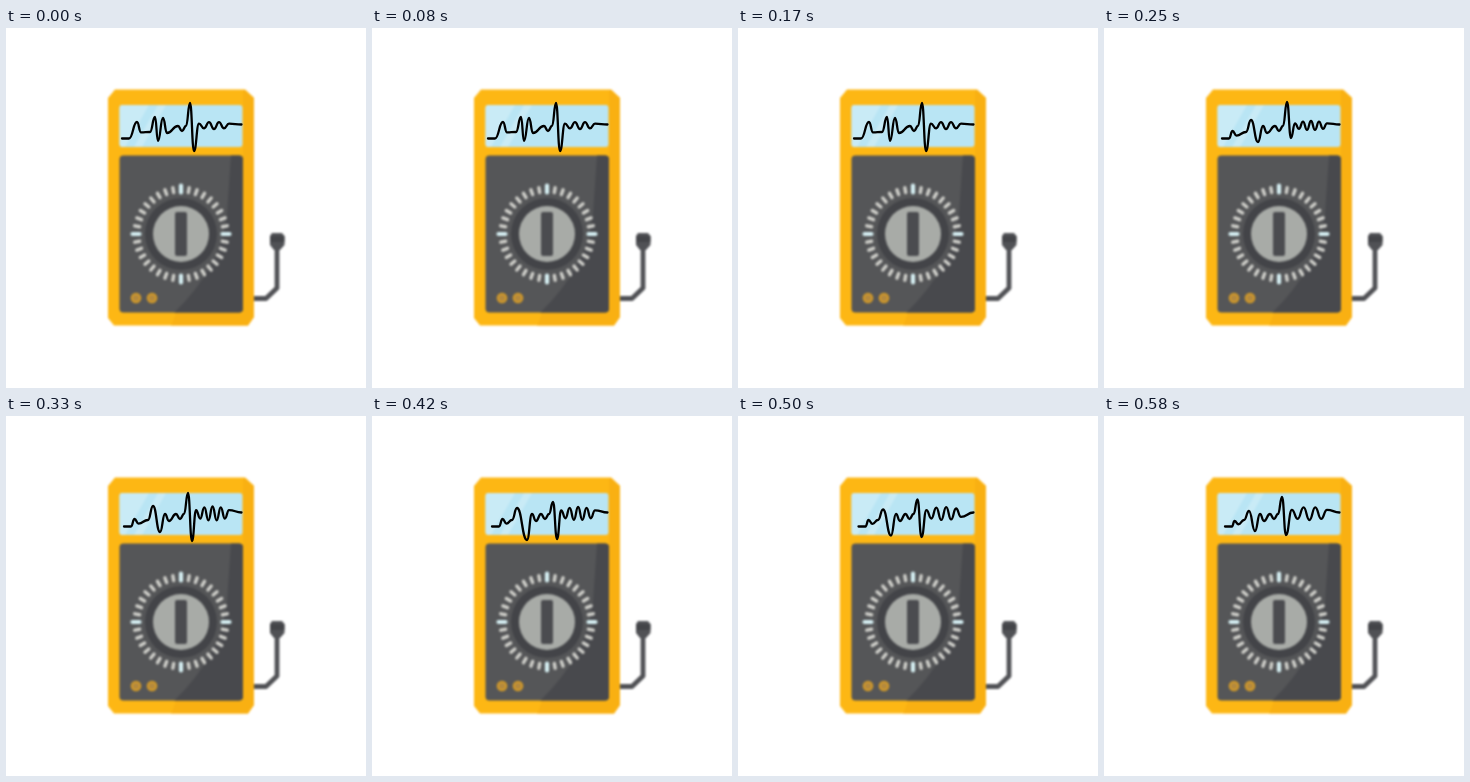
Animation, 360 px wide and 360 px high, one loop 660 ms. Source, as an HTML page:

```html
<!DOCTYPE html>
<html lang="en">
<head>
<meta charset="utf-8">
<title>Multimeter</title>
<style>
  html, body { margin: 0; width: 100%; height: 100%; overflow: hidden; background: #fff; }
  svg { display: block; width: 100vw; height: 100vh; }
  #meter { filter: blur(.9px); }
</style>
</head>
<body>
<svg viewBox="0 0 360 360">
  <defs>
    <clipPath id="case"><path d="M109 61.5H239L248 70V289L242 297.5H108L102 290V70Z"/></clipPath>
    <clipPath id="screen"><rect x="113.5" y="77" width="123" height="42" rx="3"/></clipPath>
    <clipPath id="panel"><rect x="113.5" y="127.5" width="123.5" height="157" rx="4"/></clipPath>
  </defs>
  <g id="meter">
    <path d="M248 270.5H260L271 260V220" fill="none" stroke="#505155" stroke-width="4.8" stroke-linejoin="round"/>
    <path d="M266 205H276L278.5 208V217L274 222H268L264 217V208Z" fill="#505155"/>
    <path d="M264 208H278.5V214H264Z" fill="#434448"/>

    <g clip-path="url(#case)">
      <rect x="101" y="61" width="148" height="238" fill="#fdb714"/>
      <path d="M165 298L170 285H237V62H249V298Z" fill="#f9b012"/>
    </g>

    <g clip-path="url(#screen)">
      <rect x="113" y="77" width="125" height="42" fill="#b9e5f4"/>
      <path d="M113 77H143L119 119H113ZM152 77H160L136 119H128Z" fill="#c9ebf6"/>
    </g>

    <g clip-path="url(#panel)">
      <rect x="113" y="127" width="125" height="158" fill="#555658"/>
      <path d="M225 127H238V285H168Q216 238 221 185Z" fill="#48494d"/>
    </g>
    <g id="ticks" stroke-linecap="round"></g>
    <circle cx="175" cy="206" r="36" fill="#434448"/>
    <circle cx="175" cy="206" r="28" fill="#a8aba7"/>
    <rect x="169" y="184" width="12" height="44" rx="2" fill="#4b4c50"/>
    <g fill="#b58a3d" stroke="#d29a28" stroke-width="2">
      <circle cx="130" cy="270" r="4.3"/>
      <circle cx="146" cy="270" r="4.3"/>
    </g>
  </g>
  <path id="trace" fill="none" stroke="#000" stroke-width="2.3" stroke-linecap="round" stroke-linejoin="round"/>
</svg>
<script>
  const TICKS = 36;
  let marks = '';
  for (let i = 0; i < TICKS; i++) {
    const major = i % 9 === 0;
    marks += `<path d="M175 ${major ? 157.5 : 159}V${major ? 164.5 : 164}"
      transform="rotate(${i * 360 / TICKS} 175 206)"
      stroke="${major ? '#d5eef2' : '#cfcfca'}" stroke-width="${major ? 4.2 : 3.4}"/>`;
  }
  document.getElementById('ticks').innerHTML = marks;

  // A heartbeat: small bump, beat with rebound, tall spike, then a fading ripple.
  const wide = { start: 116, bump: 16, beat: 149, top: 89, fall: 3, low: 113, rebound: 90,
                 spike: 184, peak: 75, trough: 123, ripples: 7, swell: 3.5 };
  const calm = { start: 118, bump: 7, beat: 147, top: 92, fall: 7, low: 114, rebound: 98,
                 spike: 183, peak: 74, trough: 110, ripples: 9, swell: 4.5 };
  const deep = { ...calm, top: 90, low: 116, spike: 182, peak: 77, trough: 125, swell: 7 };
  const double = { ...calm, start: 120, beat: 145, fall: 10, low: 124,
                   spike: 181, peak: 86, trough: 123, swell: 6.5 };
  const soft = { ...calm, start: 121, bump: 5, beat: 145, top: 95, fall: 6, low: 115,
                 spike: 178, peak: 81, trough: 119, ripples: 7, swell: 6.5 };

  const between = (a, b) =>
    Object.fromEntries(Object.keys(a).map(key => [key, (a[key] + b[key]) / 2]));

  function turningPoints(p) {
    const bumpX = p.start + 7 + p.bump / 2;
    const lowX = p.beat + p.fall;
    const troughX = p.spike + 4;
    const points = [
      [p.start, 110.5], [p.start + 7, 110.5],
      [bumpX, 110 - p.bump], [bumpX + 4, 110 - p.bump * 0.35],
      [p.beat - 5, 104], [p.beat, p.top], [lowX, p.low],
      [lowX + 5, p.rebound], [lowX + 9, 105],
      [p.spike - 12, 98], [p.spike - 8, 103], [p.spike - 4, 98],
      [p.spike, p.peak], [troughX, p.trough]
    ];
    const step = (223 - troughX) / p.ripples;
    for (let k = 1; k <= p.ripples; k++) {
      const size = p.swell * Math.sin(Math.PI * k / (p.ripples + 1)) ** 0.6;
      points.push([troughX + k * step, 97.5 + (k % 2 ? -size : size)]);
    }
    return [...points, [235.5, 96.5]];
  }

  // Joins turning points with curves that are level at each point.
  function smoothPath(points) {
    return points.map(([x, y], i) => {
      if (!i) return `M${x} ${y}`;
      const [px, py] = points[i - 1];
      const mid = (px + x) / 2;
      return `C${mid} ${py} ${mid} ${y} ${x} ${y}`;
    }).join('');
  }

  const LOOP = 660;
  const steps = [
    [0, wide], [250, calm], [330, deep], [420, double],
    [500, between(double, soft)], [580, soft]
  ].map(([start, pose]) => ({ start, path: smoothPath(turningPoints(pose)) }));

  const trace = document.getElementById('trace');
  function draw(now) {
    const time = now % LOOP;
    trace.setAttribute('d', steps.filter(s => s.start <= time).pop().path);
    requestAnimationFrame(draw);
  }
  draw(0);
</script>
</body>
</html>
```
